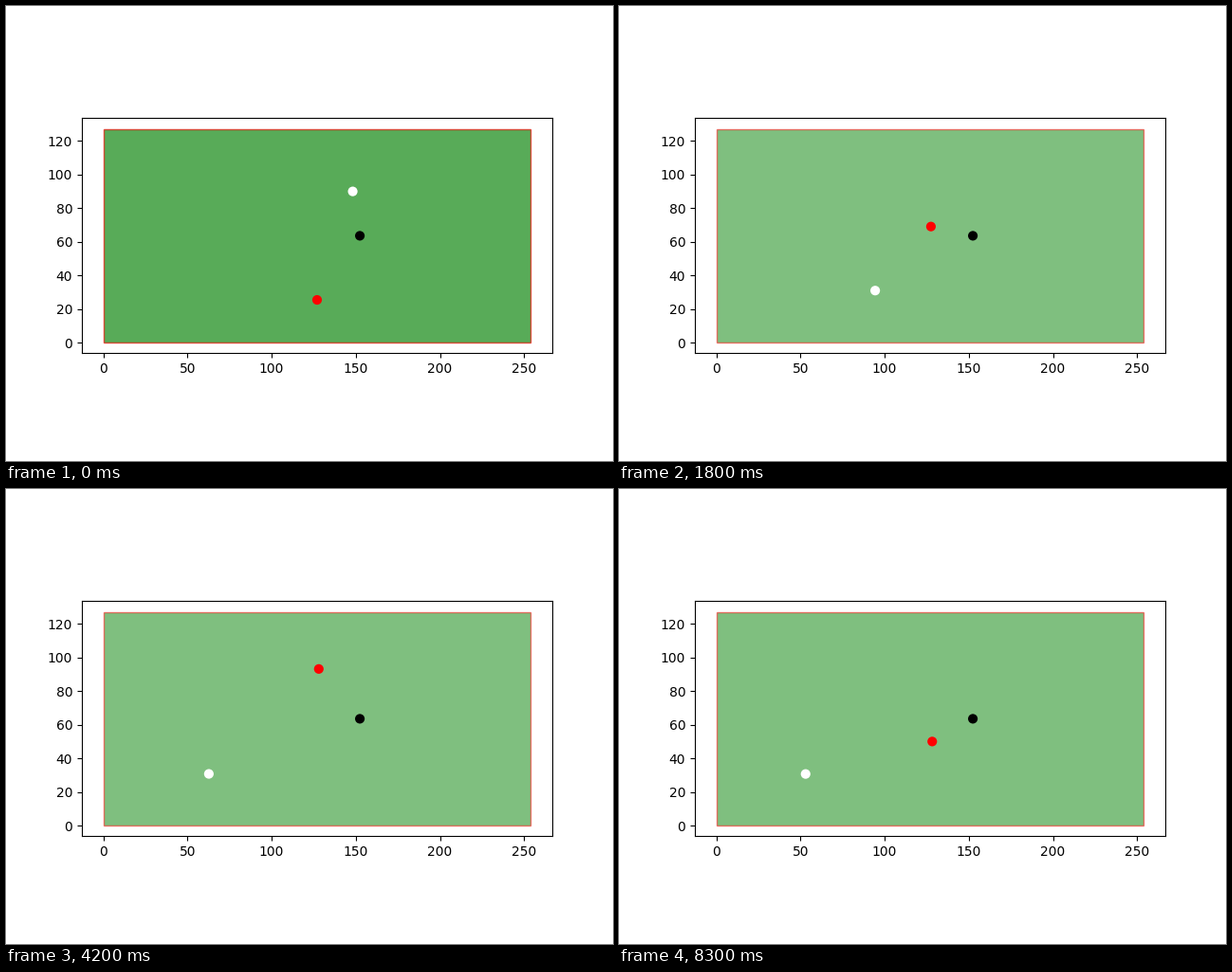
Write a matplotlib script that moves like this. It is 640x480 px and loops after 8400 ms.

```python
import math

import matplotlib.pyplot as plt
from matplotlib.animation import FuncAnimation
from matplotlib.patches import Circle, Rectangle

W, H = 254, 127          # table size in cm
R = 2.86                 # ball radius
DRAG = 0.4               # exponential slowdown per second
STOP = 4.0               # speed below which a ball rests
SPEED = 127.28           # speed of the shot
STEP = 0.1               # seconds per frame
FRAMES = 84

START = (0.6 * W, 0.8 * H)
RED = (0.5 * W, 0.2 * H)
BLACK = (0.6 * W, 0.5 * H)

# Unit vector from the cue ball to the red ball at contact
TILT = 0.0058
NX, NY = TILT, -math.sqrt(1 - TILT ** 2)
HIT = (RED[0] - 2 * R * NX, RED[1] - 2 * R * NY)

GAP = math.dist(START, HIT)
DX, DY = (HIT[0] - START[0]) / GAP, (HIT[1] - START[1]) / GAP
HIT_SPEED = SPEED - DRAG * GAP
HIT_TIME = math.log(SPEED / HIT_SPEED) / DRAG
PUSH = HIT_SPEED * (DX * NX + DY * NY)
REST = (HIT_SPEED * DX - PUSH * NX, HIT_SPEED * DY - PUSH * NY)


def travel(speed, t):
    """Distance rolled after t seconds."""
    dist = speed / DRAG * (1 - math.exp(-DRAG * t))
    return min(dist, (speed - STOP) / DRAG)


def fold(v, size):
    """Reflect a coordinate between two cushions."""
    span = size - 2 * R
    v = (v - R) % (2 * span)
    return R + min(v, 2 * span - v)


def roll(pos, vel, t):
    speed = math.hypot(*vel)
    k = travel(speed, t) / speed
    return fold(pos[0] + k * vel[0], W), fold(pos[1] + k * vel[1], H)


def place(t):
    """Positions of the cue ball and the red ball."""
    if t < HIT_TIME:
        return roll(START, (SPEED * DX, SPEED * DY), t), RED
    t -= HIT_TIME
    return roll(HIT, REST, t), roll(RED, (PUSH * NX, PUSH * NY), t)


fig, ax = plt.subplots(figsize=(6.4, 4.8), dpi=100)
ax.set_xlim(-0.05 * W, 1.05 * W)
ax.set_ylim(-0.05 * H, 1.05 * H)
ax.set_aspect("equal")


def add_table(alpha):
    return ax.add_patch(Rectangle((0, 0), W, H, facecolor="green",
                                  edgecolor="red", alpha=alpha))


def add_ball(pos, color):
    return ax.add_patch(Circle(pos, R, facecolor=color, linewidth=0, zorder=2))


add_table(0.5)
shade = add_table(0.3)
add_ball(BLACK, "black")
white = add_ball(START, "white")
red = add_ball(RED, "red")


def update(i):
    white.center, red.center = place((i + 1) * STEP)
    shade.set_visible(i == 0)
    return white, red, shade


anim = FuncAnimation(fig, update, frames=FRAMES, interval=100,
                     init_func=lambda: update(0), repeat=True, repeat_delay=0)
plt.show()
```
